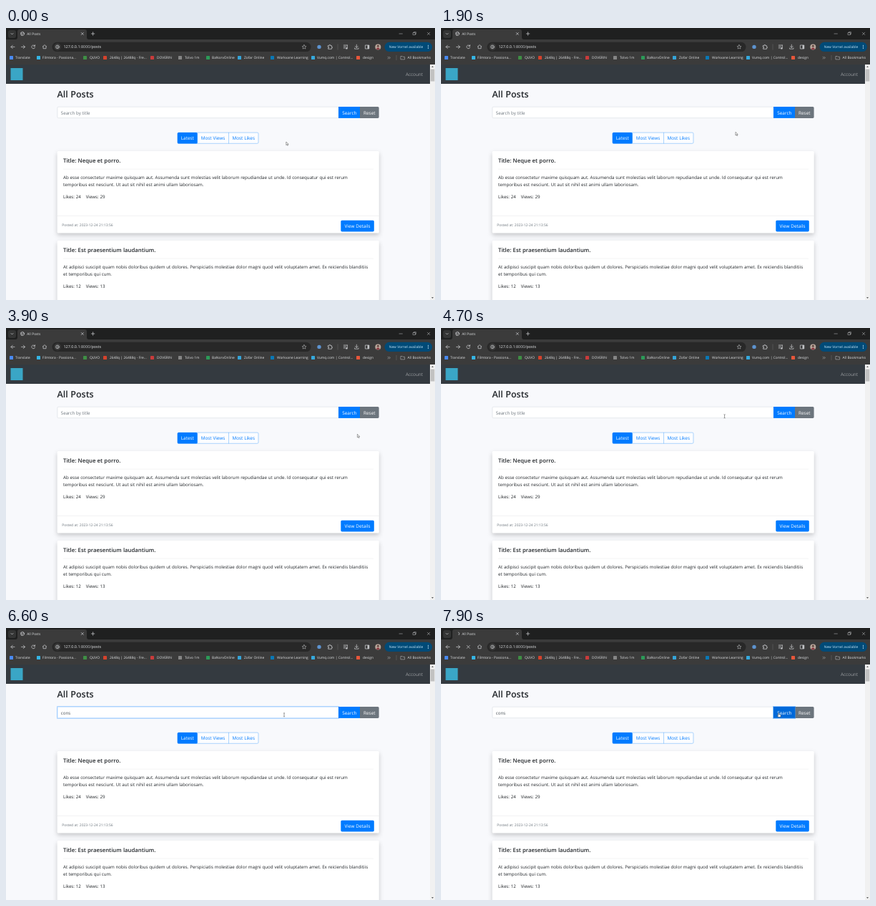
Write an HTML page that moves like this. It is 600 px wide and 380 px high and loops after 8 s.

```html
<!DOCTYPE html>
<html lang="en">
<head>
<meta charset="utf-8">
<title>All Posts</title>
<style>
html, body { margin: 0; width: 100%; height: 100%; overflow: hidden; background: #f8f9fc; }
svg { display: block; width: 600px; height: 380px; }
text { font: 6.2px "Open Sans", "Noto Sans", sans-serif; word-spacing: .03em; fill: #212529; white-space: pre; text-rendering: geometricPrecision; }
.mid { font-size: 6.4px; text-anchor: middle; }
.h1 { font-size: 12.5px; font-weight: 600; }
.h5 { font-size: 7.75px; font-weight: 600; }
.small { font-size: 4.95px; fill: #6c757d; }
.white { fill: #fff; }
.blue { fill: #007bff; }
.bar { font-size: 4.85px; fill: #dfe1e3; }
.url { font-size: 5.45px; fill: #e8eaed; }
.icon { fill: none; stroke: #c8cacd; stroke-width: .75; stroke-linecap: round; stroke-linejoin: round; }
.thin { stroke-width: .5; }
.card { fill: #fff; filter: drop-shadow(0 3px 3.2px rgba(0, 0, 0, .2)); }
</style>
</head>
<body>
<svg id="stage" viewBox="0 0 600 380"></svg>
<script>
const rect = (x, y, w, h, fill, r = 0, more = '') =>
  `<rect x="${x}" y="${y}" width="${w}" height="${h}" fill="${fill}" rx="${r}" ${more}/>`;
const text = (x, y, s, cls = '', more = '') => `<text x="${x}" y="${y}" class="${cls}" ${more}>${s}</text>`;
const icon = (d, cls = '', more = '') => `<path class="icon ${cls}" d="${d}" ${more}/>`;
const disc = (x, y, r, fill) => `<circle cx="${x}" cy="${y}" r="${r}" fill="${fill}"/>`;
const ring = (x, y, r) => `<circle class="icon" cx="${x}" cy="${y}" r="${r}"/>`;

const bookmarks = [
  [5, 13, 'Translate', '#4a8af4'], [43, 51, 'Filmtora - Passiona...', '#35b5e5'],
  [108, 117, 'QUVO', '#3f8f45'], [136, 145, '2648q | 26488q - Fre...', '#d5422c'],
  [202, 211, 'DOVERIN', '#c93b3b'], [241, 250, 'Tolvo 1m', '#858585'],
  [280, 288, 'BaNorvOnline', '#2c9a58'], [324, 333, 'Zofar Online', '#35a4d8'],
  [370, 379, 'Workvane Learning', '#0a78b5'], [427, 435, 'Vumq.com | Control...', '#35a9dd'],
  [490, 499, 'design', '#e8563a']
];

function browser() {
  return rect(0, 0, 600, 17, '#1f2020') + rect(0, 16, 600, 35, '#3b3b3b') +
    `<path d="M13 16q3 0 3-3V5q0-3 3-3h91q3 0 3 3v8q0 3 3 3z" fill="#3b3b3b"/>` +
    rect(3, 3, 11, 11, '#343535', 3) + icon('M7 7.5l1.5 1.5L10 7.5') +
    `<g id="globe">${ring(23, 8, 2.5)}${icon('M21 7l2 1-1 2M24 6l1 2')}</g>` +
    icon('M23 5.4a2.6 2.6 0 0 1 2.6 2.6', '', 'id="spinner"') +
    text(29.3, 10, 'All Posts', 'bar') +
    icon('M105.3 6.5l3 3m0-3l-3 3M119.4 8h4.4M121.6 5.8v4.4') +
    icon('M550 8h4.4M569.4 6.6h3v3h-3zM570.4 6.6v-1h3v3h-1M589.4 6.2l3.4 3.4m0-3.4l-3.4 3.4', 'thin') +
    icon('M12 26.4H7m2.3-2.3L7 26.4l2.3 2.3') +
    icon('M21.5 26.4h5m-2.3-2.3l2.3 2.3-2.3 2.3') +
    icon('M40.3 25.1a2.4 2.4 0 1 0 .2 2.2M40.5 23.7v1.7h-1.7', '', 'id="reload"') +
    icon('M36.2 24.4l4 4m0-4l-4 4', '', 'id="stop"') +
    icon('M51.3 26l2.7-2.4 2.7 2.4M52 25.7v3h4v-3') +
    rect(64.5, 19.7, 362, 13.4, '#282828', 6.7) + disc(72, 26.4, 4.8, '#3b3b3b') +
    ring(72, 26.4, 2.3) + icon('M72 26.2v1.2M72 25.1v.1') +
    text(80.5, 28.4, '127.0.0.1<tspan fill="#c4c7ca">:8000</tspan>/posts', 'url') +
    icon('M417 23.5l.9 1.9 2.1.2-1.6 1.4.5 2.1-1.9-1.1-1.9 1.1.5-2.1-1.6-1.4 2.1-.2z', 'thin') +
    disc(438, 26.4, 2.7, '#5d93cf') +
    icon('M450.6 24.6h1.5v-1h1.5v1h1.8v1.8h.9v1.4h-.9v1.5h-4.8v-1.5h.9v-1.4h-.9z') +
    rect(463.8, 22.5, .4, 8, '#777') +
    icon('M472.3 24h5M472.3 26h3M472.3 28h2M477.3 24v4') + disc(476.4, 28.4, 1.2, '#c8cacd') +
    icon('M490.3 23.2v4m-1.8-1.6l1.8 1.8 1.8-1.8M487.6 28v1.2h5.4V28') +
    icon('M502.8 24h5v5h-5z') + rect(505.6, 24, 2.2, 5, '#c8cacd') +
    disc(520.3, 26.4, 4, '#b9a69b') + disc(520.3, 25.2, 1.4, '#5b423b') +
    `<path d="M517.7 29.4q2.6-4.4 5.2 0-2.6 1.8-5.2 0z" fill="#8b3b43"/>` +
    rect(529.5, 19.7, 66.5, 13.4, '#004a77', 6.7) +
    text(535.8, 28.1, 'New Vornel available', 'bar', 'style="fill:#c9e8fb"') +
    [24.4, 26.4, 28.4].map(y => disc(590.5, y, .6, '#c9e8fb')).join('') +
    bookmarks.map(([ix, tx, s, c]) => rect(ix, 39, 5, 5, c, .6) + text(tx, 43.3, s, 'bar')).join('') +
    icon('M534 40.2l1.4 1.4-1.4 1.4M536 40.2l1.4 1.4-1.4 1.4', 'thin') +
    rect(545.8, 38, .4, 7, '#777') +
    icon('M552.3 39.5h2l.7.8h2.6v3.6h-5.3z', 'thin') + text(561.5, 43.3, 'All Bookmarks', 'bar');
}

function card(y, title, lines, likes, views) {
  return `<g transform="translate(0 ${y})"><rect class="card" x="71.7" width="450" height="114.5" rx="1.6"/>` +
    text(80, 16.2, title, 'h5') + rect(80, 24.8, 434, .5, '#e9eaec') +
    lines.map((s, i) => text(80, 39.2 + i * 9.8, s)).join('') +
    text(80, 66, 'Likes: ' + likes) + text(111.7, 66, 'Views: ' + views) +
    rect(71.7, 90, 450, .5, '#e4e5e7') +
    text(78.3, 104.6, 'Posted at: 2023-12-24 21:13:56', 'small') +
    rect(468.3, 96.8, 46.5, 15.6, '#007bff', 1.6) + text(491.6, 107.2, 'View Details', 'white mid') + '</g>';
}

function page() {
  return rect(0, 51, 600, 27, '#343a40') + rect(6.5, 56, 17, 17, '#3aa6c6') +
    text(571, 67.2, 'Account', 'mid', 'style="fill:#9a9da0"') +
    text(71.4, 97, 'All Posts', 'h1') +
    rect(71.9, 110.2, 393.3, 15.5, '#fff', 1.4, 'id="field" stroke-width=".5"') +
    text(76.8, 120.6, '', '', 'id="query"') + rect(0, 114.6, .5, 7, '#222', 0, 'id="caret"') +
    `<path d="M495 110h25q1.6 0 1.6 1.6v12.7q0 1.6-1.6 1.6h-25z" fill="#6c757d"/>` +
    rect(465, 110, 30, 15.9, '#007bff', 0, 'id="search"') +
    text(480.3, 120.6, 'Search', 'white mid') + text(508.3, 120.6, 'Reset', 'white mid') +
    rect(240, 146.1, 113, 15.2, '#fcfdff', 1.6, 'stroke="#5aa8fb" stroke-width=".5"') +
    rect(239.8, 145.9, 28, 15.6, '#007bff', 1.6) + rect(311.2, 146, .5, 15.4, '#5aa8fb') +
    text(253.8, 156.3, 'Latest', 'white mid') + text(289.5, 156.3, 'Most Views', 'blue mid') +
    text(332.2, 156.3, 'Most Likes', 'blue mid') +
    card(172, 'Title: Neque et porro.', [
      'Ab esse consectetur maxime quisquam aut. Assumenda sunt molestias velit laborum repudiandae ut unde. Id consequatur qui est rerum',
      'temporibus est nesciunt. Ut aut sit nihil est animi ullam laboriosam.'], 24, 29) +
    card(297, 'Title: Est praesentium laudantium.', [
      'At adipisci suscipit quam nobis doloribus quidem ut dolores. Perspiciatis molestiae dolor magni quod velit voluptatem amet. Ex reiciendis blanditiis',
      'et temporibus qui cum.'], 12, 13) +
    rect(593, 51, 7, 329, '#f1f1f1') + rect(593.7, 57.5, 5.6, 17, '#c1c1c1') +
    `<path d="M595 55l1.5-2 1.5 2zM595 376l1.5 2 1.5-2z" fill="#606060"/>`;
}

const pointers =
  `<path id="arrow" d="M0 0v4.6l1.1-1 .8 1.7.8-.4-.8-1.6h1.4z" fill="#fff" stroke="#333" stroke-width=".45"/>` +
  `<path id="beam" d="M-1-2.6Q0-2.6 0-2 0-2.6 1-2.6M0-2v4M-1 2.6Q0 2.6 0 2 0 2.6 1 2.6" fill="none" stroke="#333" stroke-width=".5"/>` +
  `<path id="hand" d="M-.6-2.6q.6-.7 1.1 0V-.7l2 .5q.6.2.5 1L2.5 3H-.4L-2.1.8q.1-.8.9-.4l.6.5z" fill="#fff" stroke="#222" stroke-width=".45"/>`;

const stage = document.getElementById('stage');
stage.innerHTML = page() + browser() + pointers;
const el = id => document.getElementById(id);
const show = (id, on) => el(id).style.display = on ? '' : 'none';

// time, x, y
const path = [[0, 391.8, 159], [400, 391.8, 159], [1000, 351.4, 135.3], [1400, 351.4, 135.3],
  [2200, 440, 150], [3200, 470, 158], [3900, 491.4, 148.3], [4200, 491.4, 148.3],
  [4800, 389, 121.3], [6700, 389, 121.3], [7200, 472.3, 121.5], [8000, 472.3, 121.5]];

function pointerAt(t) {
  const i = path.findIndex(p => p[0] > t), [t0, x0, y0] = path[i - 1], [t1, x1, y1] = path[i];
  const u = (t - t0) / (t1 - t0), k = u * u * (3 - 2 * u);
  return [x0 + (x1 - x0) * k, y0 + (y1 - y0) * k];
}

function draw(now) {
  const t = Math.floor(now % 8000 / 100) * 100;
  const [x, y] = pointerAt(t);
  const inBox = y > 110 && y < 126;
  const hidden = t >= 2300 && t < 3200;
  const kind = hidden ? '' : !inBox ? 'arrow' : x < 465 ? 'beam' : 'hand';
  for (const id of ['arrow', 'beam', 'hand']) {
    show(id, id === kind);
    el(id).setAttribute('transform', `translate(${x} ${y})`);
  }

  const focused = t >= 4900 && t < 7300, clicked = t >= 7300;
  el('field').setAttribute('stroke', focused ? '#80bdff' : '#ced4da');
  el('field').style.outline = focused ? '1.3px solid rgba(0,123,255,.25)' : '';
  el('search').setAttribute('fill', kind === 'hand' ? '#0069d9' : '#007bff');
  el('search').style.outline = clicked ? '1.3px solid rgba(38,143,255,.5)' : '';

  const typed = 'cons'.slice(0, [5600, 5800, 5900, 6100].filter(k => t >= k).length);
  const query = el('query');
  query.textContent = typed || 'Search by title';
  query.style.fill = typed ? '#495057' : '#6c757d';
  el('caret').setAttribute('x', typed ? 77 + query.getComputedTextLength() : 76.8);
  const lastKey = t >= 6100 ? 6100 : t >= 5600 ? t : 4900;
  show('caret', focused && (t - lastKey) % 1000 < 500);

  const loading = t >= 7500;
  show('globe', !loading);
  show('spinner', loading);
  show('reload', !loading);
  show('stop', loading);
  el('spinner').setAttribute('transform', `rotate(${-t * .36} 23 8)`);
}

function loop(now) {
  draw(now);
  requestAnimationFrame(loop);
}
loop(0);
</script>
</body>
</html>
```
